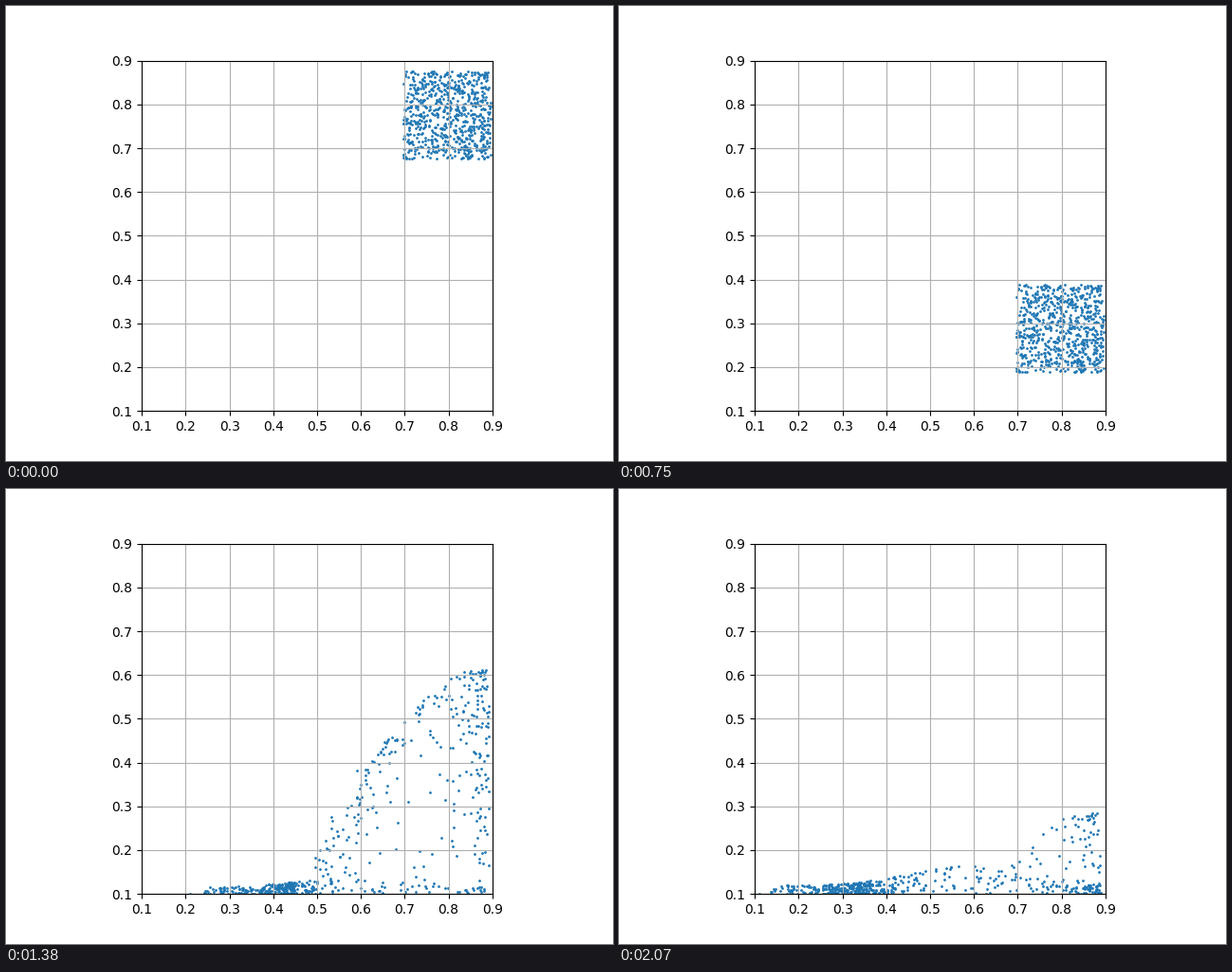
Write a matplotlib script that moves like this. It is 640 px wide and 480 px high and loops after 2.1 s.

```python
import numpy as np
import matplotlib.pyplot as plt
from matplotlib.animation import FuncAnimation

COUNT, FRAMES, STEP_MS = 700, 70, 30
FALL = 0.00078      # half the gravity, per frame squared
HIT = 27.6          # moment the block strikes the floor
FLOOR = 0.1
DRAG = 12.0         # frames a landed grain keeps sliding

rng = np.random.default_rng(4)
u, v = rng.random((2, COUNT))
heap = rng.random(COUNT)
rest_x = 0.1 + 0.08 * rng.random(COUNT) ** 2
x0, y0 = 0.696 + 0.2 * u, 0.676 + 0.2 * v


def smooth(t):
    t = np.clip(t, 0, 1)
    return t * t * (3 - 2 * t)


# Impulse of the impact: strongest upwards near the wall, sideways at the foot
left, low = 1 - u, 1 - v
reach = 0.65 * left + 0.4 * low
lift = 0.0755 - 0.05 * np.tanh(0.27 * reach ** 3.1 / 0.05)
lift += 0.0005 * rng.standard_normal(COUNT) * reach
push = -0.0002 - 0.016 * left ** 1.6 - 0.034 * low * smooth((left - 0.15) / 0.3)
push += 0.001 * rng.standard_normal(COUNT) * left

# Time at which each grain comes down on the floor
root = lift ** 2 + 4 * FALL * (y0 - lift * HIT - FLOOR)
land = np.maximum(HIT, (lift + np.sqrt(np.maximum(root, 0))) / (2 * FALL))


def pile(x, n):
    """Thickness of the settled layer at x."""
    g = np.clip((n - 34) / 25, 0, 1)
    mound = 0.045 * np.exp(-((x - 0.57) / 0.17) ** 2)
    corner = 0.012 * np.exp(-((x - 0.1) / 0.05) ** 2)
    return 0.01 + g * (0.01 + mound + corner)


def grains(n):
    fall = y0 - FALL * n * n
    if n < HIT:
        return np.column_stack((x0, fall))
    flight = np.minimum(n, land) - HIT
    slide = DRAG * (1 - np.exp(-np.maximum(n - land, 0) / DRAG))
    x = np.maximum(x0 + push * (flight + slide), rest_x)
    ground = FLOOR + pile(x, n) * (1 - 1.45 * heap)
    y = np.maximum(fall + lift * (n - HIT), ground)
    return np.column_stack((x, y))


fig, ax = plt.subplots(figsize=(6.4, 4.8), dpi=100)
ax.set_aspect("equal")
ax.set(xlim=(0.1, 0.9), ylim=(0.1, 0.9))
ax.grid(True)
dots = ax.scatter(x0, y0, s=1)


def update(n):
    dots.set_offsets(grains(n))
    return dots,


anim = FuncAnimation(fig, update, frames=FRAMES, interval=STEP_MS,
                     repeat=True, repeat_delay=0)
plt.show()
```
